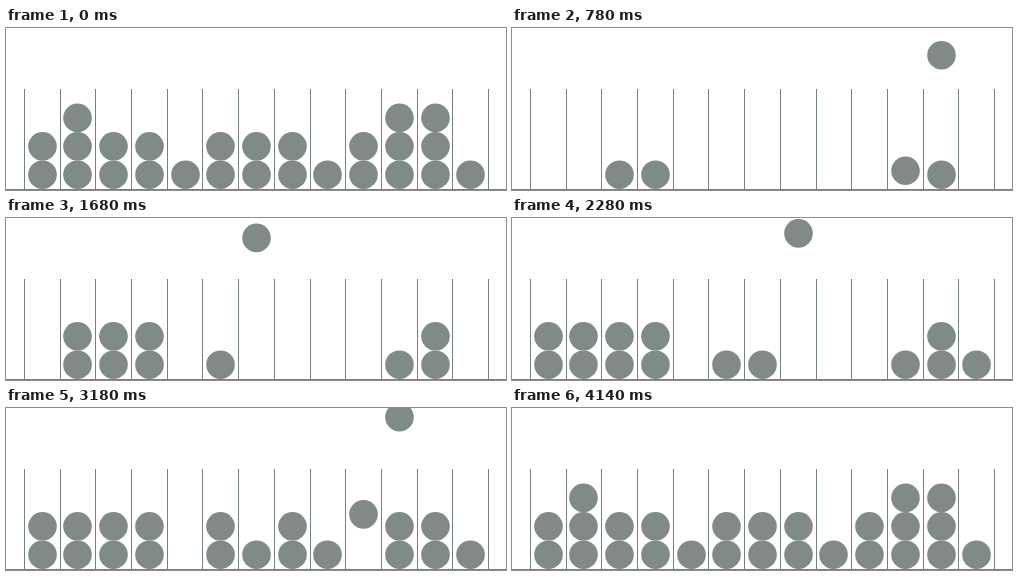
An HTML page with a canvas for the animation above (4200 ms loop, 500 by 162 pixels).

```html
<!DOCTYPE html>
<html lang="en">
<head>
<meta charset="utf-8">
<title>Balls dropping into bins</title>
<style>
  html, body { margin: 0; width: 100%; height: 100%; overflow: hidden; background: #fff; }
  canvas { display: block; }
</style>
</head>
<body>
<canvas id="stage" width="500" height="162"></canvas>
<script>
const ctx = document.getElementById("stage").getContext("2d");
const WIDTH = 500, HEIGHT = 162, FLOOR = 161, WALL_TOP = 61;
const BINS = 13, PITCH = WIDTH / (BINS + 1), RADIUS = PITCH * 0.4;
const LOOP = 4200, STEP = 60;
const FIRST_DROP = 1, DROP_GAP = 152.44;
const START_Y = -17, HALF_G = 0.001544;
const BALL = "#808a86", LINE = "#74837d";

// Bin of each ball, in order of release
const order = [3, 2, 11, 10, 11, 3, 5, 1, 2, 1, 6, 12, 0, 0, 7,
               7, 10, 5, 8, 9, 10, 1, 6, 9, 11, 4];
const heights = new Array(BINS).fill(0);
const balls = order.map((bin, i) => ({
  x: Math.round(PITCH * (bin + 1)) + 0.5,
  restY: 146.7 - 28.4 * heights[bin]++,
  start: FIRST_DROP + DROP_GAP * i
}));

function drawBins() {
  ctx.fillStyle = LINE;
  for (let i = 0; i <= BINS; i++) {
    ctx.fillRect(Math.round(PITCH * (i + 0.5)), WALL_TOP, 1, FLOOR - WALL_TOP);
  }
  ctx.fillRect(0, FLOOR, WIDTH, 1);
}

function drawBall(x, y) {
  ctx.beginPath();
  ctx.arc(x, y, RADIUS, 0, Math.PI * 2);
  ctx.fill();
}

function draw(time) {
  ctx.fillStyle = "#fff";
  ctx.fillRect(0, 0, WIDTH, HEIGHT);
  drawBins();
  ctx.fillStyle = BALL;
  for (const { x, restY, start } of balls) {
    // The loop opens on the full bins
    const age = time === 0 ? LOOP : time - start;
    if (age > 0) drawBall(x, Math.min(restY, START_Y + HALF_G * age * age));
  }
}

const origin = performance.now();
function tick() {
  const time = (performance.now() - origin) % LOOP;
  draw(Math.floor(time / STEP) * STEP);
  requestAnimationFrame(tick);
}
tick();
</script>
</body>
</html>
```
